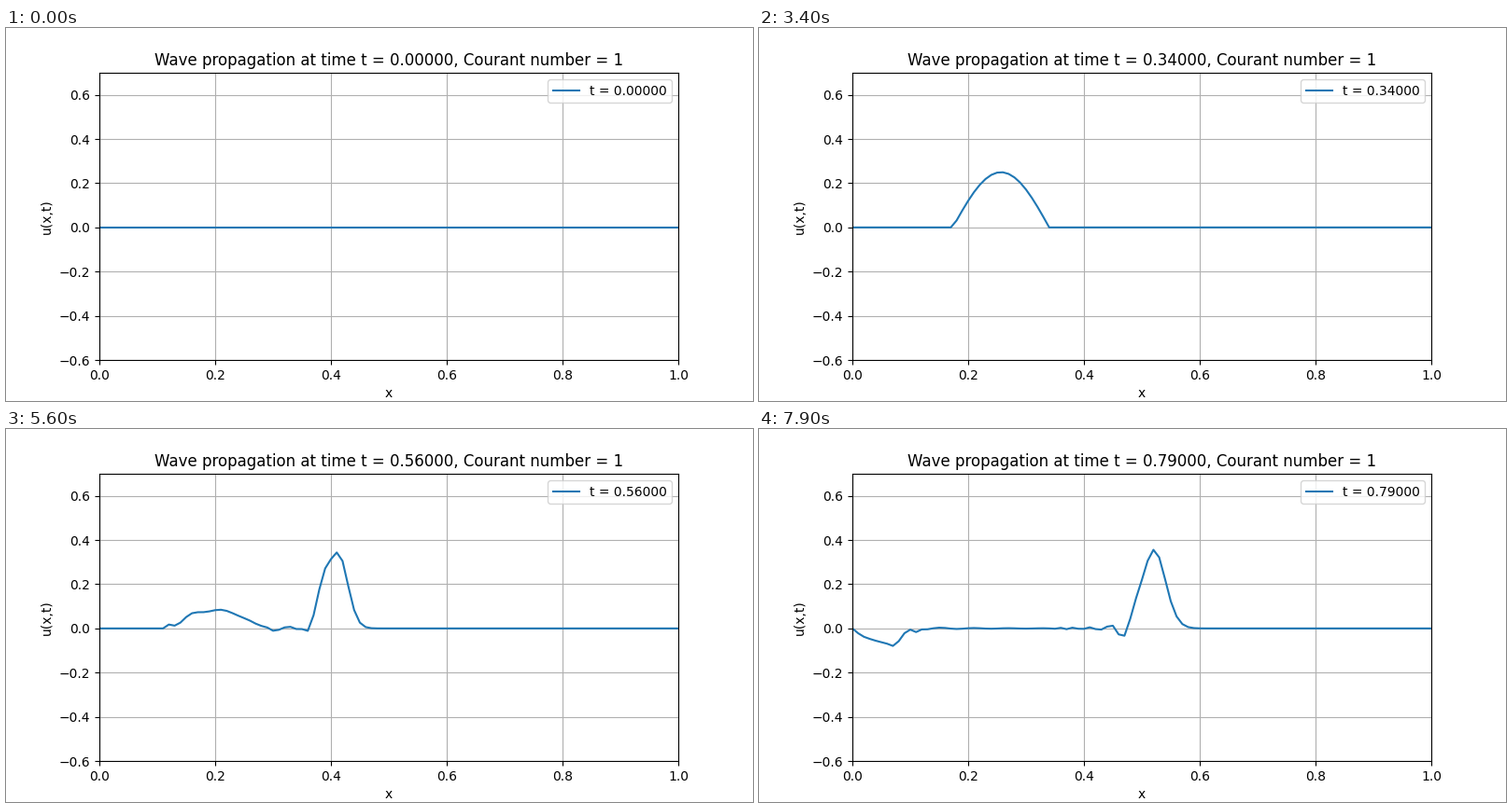
Animation, 800 px wide and 400 px high, one loop 8000 ms. Source, as a matplotlib script:

```python
import numpy as np
import matplotlib.pyplot as plt
from matplotlib.animation import FuncAnimation

NX = 100
DT = 0.01
FRAMES = 80

x = np.linspace(0, 1, NX + 1)
speed = np.where(x < 0.335, 1.0, 0.5)


def left_end(t):
    """Half a sine pulse sent in from the left boundary."""
    return 0.25 * np.sin(6 * np.pi * t) if t < 1 / 6 else 0.0


def solve():
    """Explicit scheme for u_tt = (c^2 u_x)_x at Courant number 1."""
    q = speed**2
    q_half = 0.5 * (q[:-1] + q[1:])
    u = np.zeros((FRAMES, NX + 1))
    u[1, 0] = left_end(DT)
    for n in range(1, FRAMES - 1):
        flux = q_half * np.diff(u[n])
        u[n + 1, 1:-1] = 2 * u[n, 1:-1] - u[n - 1, 1:-1] + np.diff(flux)
        u[n + 1, 0] = left_end((n + 1) * DT)
    return u


u = solve()

fig, ax = plt.subplots(figsize=(8, 4), dpi=100)
line, = ax.plot(x, u[0], label="t = 0.00000")
ax.set(xlim=(0, 1), ylim=(-0.6, 0.7), xlabel="x", ylabel="u(x,t)")
ax.grid(True)
label = ax.legend(loc="upper right").get_texts()[0]


def update(n):
    clock = f"t = {n * DT:.5f}"
    line.set_ydata(u[n])
    label.set_text(clock)
    ax.set_title(f"Wave propagation at time {clock}, Courant number = 1")
    return line, label, ax.title


anim = FuncAnimation(fig, update, frames=FRAMES, interval=100,
                     repeat=True, repeat_delay=0)
plt.show()
```
